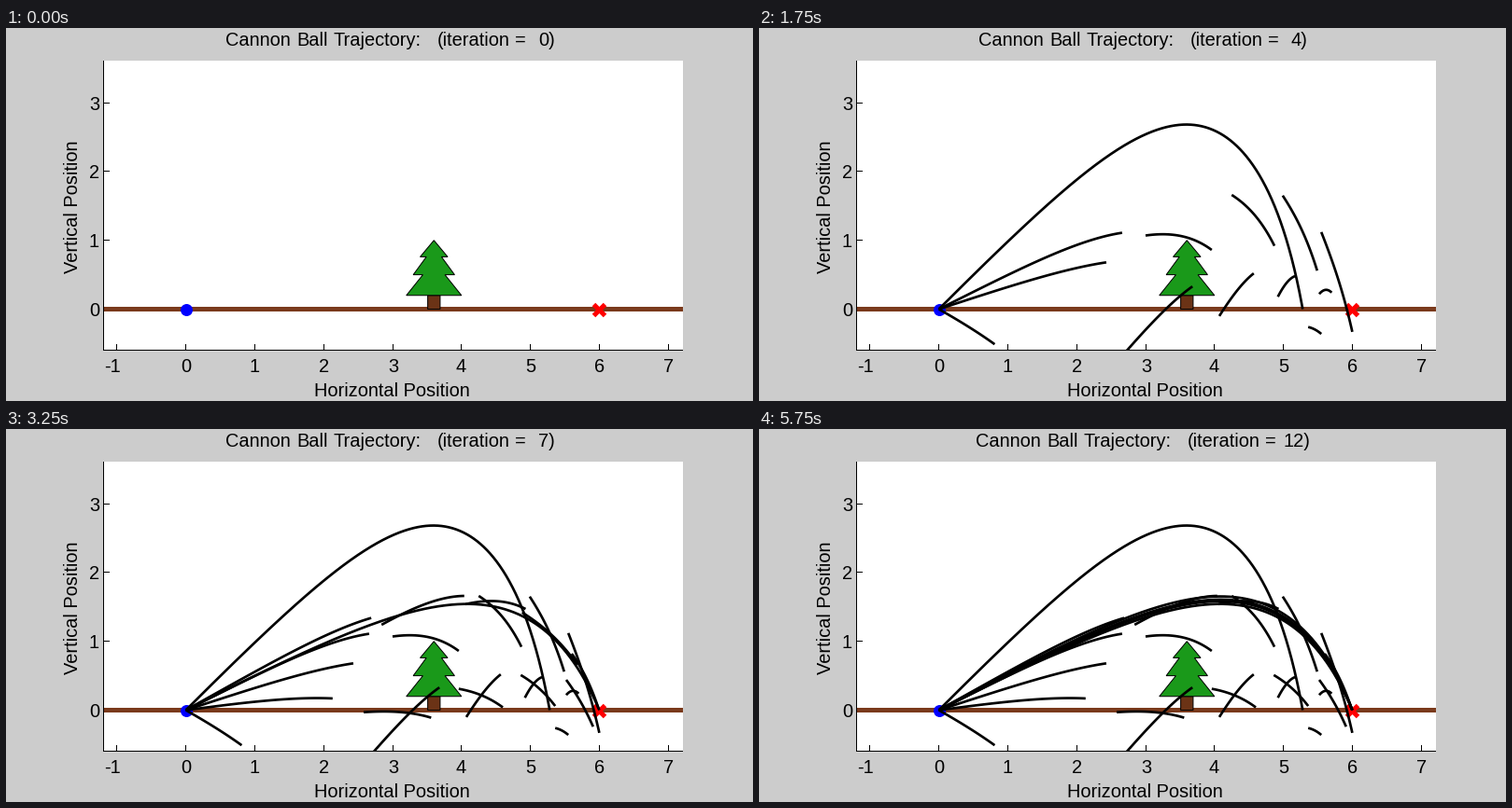
Recreate the animation shown at these times as a matplotlib script. Size 800 by 400 pixels, loop 6250 ms.

```python
import numpy as np
import matplotlib.pyplot as plt
from matplotlib.animation import FuncAnimation
from matplotlib.patches import Polygon, Rectangle

W, H, DPI = 800, 400, 100
PT = 72 / DPI                       # one pixel in points
LEFT, TOP, RIGHT, BOTTOM = 104, 35, 725, 346
X0, Y0, UNIT = 192.6, 301.5, 73.8   # screen position of (0, 0), pixels per unit
DRAG = 0.4                          # quadratic drag, with gravity 1

plt.rcParams["font.family"] = "Liberation Sans"
plt.rcParams["font.size"] = 20 * PT

fig = plt.figure(figsize=(W / DPI, H / DPI), dpi=DPI, facecolor="#cccccc")
ax = fig.add_axes([0, 0, 1, 1])
ax.set_xlim(0, W)
ax.set_ylim(H, 0)
ax.axis("off")

panel = Rectangle((LEFT, TOP), RIGHT - LEFT, BOTTOM - TOP, fc="white", lw=0)
ax.add_patch(panel)


def px(x):
    return X0 + UNIT * np.asarray(x)


def py(y):
    return Y0 - UNIT * np.asarray(y)


def stroke(xs, ys, width, color="black", z=2, **kw):
    line, = ax.plot(xs, ys, color=color, lw=width * PT, zorder=z, snap=False,
                    solid_capstyle="butt", **kw)
    return line


def label(x, y, s, **kw):
    return ax.text(x, y, s, va="baseline", zorder=6, **kw)


def shape(xs, ys, color):
    ax.add_patch(Polygon(np.column_stack([px(xs), py(ys)]), fc=color,
                         ec="black", lw=PT, zorder=3, snap=False))


def bend(p):
    return p * np.hypot(1, p) + np.arcsinh(p)


def flight(slope, reach):
    """Ball path under drag, by slope; the speed is found from the reach."""
    p = slope - 13 * np.linspace(0, 1, 2000) ** 3
    loss = DRAG * (bend(slope) - bend(p))
    lo, hi = 1e-4, 1.0
    for _ in range(40):
        b = np.sqrt(lo * hi)
        rate = 1 / (b + loss)
        dx = -np.diff(p) * (rate[1:] + rate[:-1]) / 2
        x = np.r_[0, np.cumsum(dx)]
        y = np.r_[0, np.cumsum(dx * (p[1:] + p[:-1]) / 2)]
        fall = p < 0
        land = np.interp(0, y[fall][::-1], x[fall][::-1])
        lo, hi = (b, hi) if land > reach else (lo, b)
    up = (p > 0) | (y > 0)
    return np.r_[x[up], land], np.r_[y[up], 0]


def leg(x0, y0, x1, y1, sag):
    """Short flight between two points, slowed by drag along the way."""
    t = np.linspace(0, 1, 60)
    k = np.expm1(DRAG * np.hypot(x1 - x0, y1 - y0))
    s = np.log1p(k * t) / np.log1p(k)
    return x0 + (x1 - x0) * s, y0 + (y1 - y0) * s + 4 * sag * t * (1 - t)


# axes
stroke([LEFT + .5] * 2, [TOP, BOTTOM], 1)
stroke([LEFT, RIGHT], [BOTTOM - .5] * 2, 1)
for v in range(-1, 8):
    x = np.floor(px(v)) + .5
    stroke([x, x], [BOTTOM - 7, BOTTOM], 1)
    label(x - (4 if v < 0 else 0), 369, str(v), ha="center")
for v in range(4):
    y = np.floor(py(v)) + .5
    stroke([LEFT, LEFT + 7], [y, y], 1)
    label(100, y + 7.5, str(v), ha="right")
label(329.5, 395, "Horizontal Position")
label(77, 192, "Vertical Position", ha="center", rotation=90,
      rotation_mode="anchor")

# scenery
stroke([LEFT + 1, RIGHT], [Y0, Y0], 5, "#7a3a1c")
shape([3.51, 3.69, 3.69, 3.51], [0, 0, .2, .2], "#6b3316")
half = np.array([0, .2, .11, .3, .16, .4])
level = np.array([1, .76, .76, .5, .5, .2])
shape(np.r_[3.6 + half, 3.6 - half[::-1]], np.r_[level, level[::-1]], "#1a991a")
stroke([X0], [Y0], 1, "blue", 4, marker="o", ms=13 * PT, mew=0)
stroke([px(6)], [Y0 + .4], 1, "red", 4, marker="x", ms=11.5 * PT, mew=5 * PT)

# whole flights: launch slope and reach by iteration
FLIGHTS = {1: (1, 5.28), 7: (.508, 6), 8: (.542, 6), 9: (.52, 6), 10: (.528, 6)}

# broken flights: sag shared by the legs, then the ends of each leg
LEGS = {
    2: (.015, [(0, 0, .81, -.51), (5.36, -.26, 5.55, -.36)]),
    3: (.05, [(0, 0, 2.43, .68), (2.73, -.6, 3.68, .33),
              (4.07, -.1, 4.57, .52), (4.92, .18, 5.17, .48),
              (5.52, .22, 5.7, .24)]),
    4: (.105, [(0, 0, 2.66, 1.11), (3, 1.07, 3.96, .86),
               (4.25, 1.66, 4.87, .92), (4.99, 1.65, 5.49, .56),
               (5.55, 1.12, 6, -.33)]),
    5: (.045, [(0, 0, 2.13, .17), (2.58, -.03, 3.56, -.11),
               (3.96, .31, 4.6, .04), (4.86, .51, 5.36, .06),
               (5.52, .44, 5.91, -.24)]),
    6: (.08, [(0, 0, 2.69, 1.34), (2.84, 1.24, 4.04, 1.66),
              (4.06, 1.54, 4.93, 1.47), (4.88, 1.42, 5.68, .66),
              (5.6, .82, 5.99, .02)]),
}

paths = [(it, flight(*shot)) for it, shot in FLIGHTS.items()]
paths += [(it, leg(*ends, sag)) for it, (sag, legs) in LEGS.items()
          for ends in legs]
curves = []
for it, (x, y) in paths:
    line = stroke(px(x), py(y), 2.7, z=5)
    line.set_clip_path(panel)
    curves.append((it, line))

# title, word by word
WORDS = [(235, "Cannon"), (311.5, "Ball"), (350.5, "Trajectory:"),
         (461.5, "(iteration"), (544.5, "=")]
title = [label(x, 19, s) for x, s in WORDS]
count = label(570, 19, "0)")


def update(k):
    it = (k + 1) // 2
    shift = 2.8 if it > 9 else 0
    for text, (x, _) in zip(title, WORDS):
        text.set_x(x - shift)
    count.set_x(570 - 3 * shift)
    count.set_text(f"{it})")
    for born, line in curves:
        line.set_visible(born <= it)
    return [*title, count, *(line for _, line in curves)]


anim = FuncAnimation(fig, update, frames=25, interval=250, repeat=True,
                     repeat_delay=0, blit=False)
plt.show()
```
